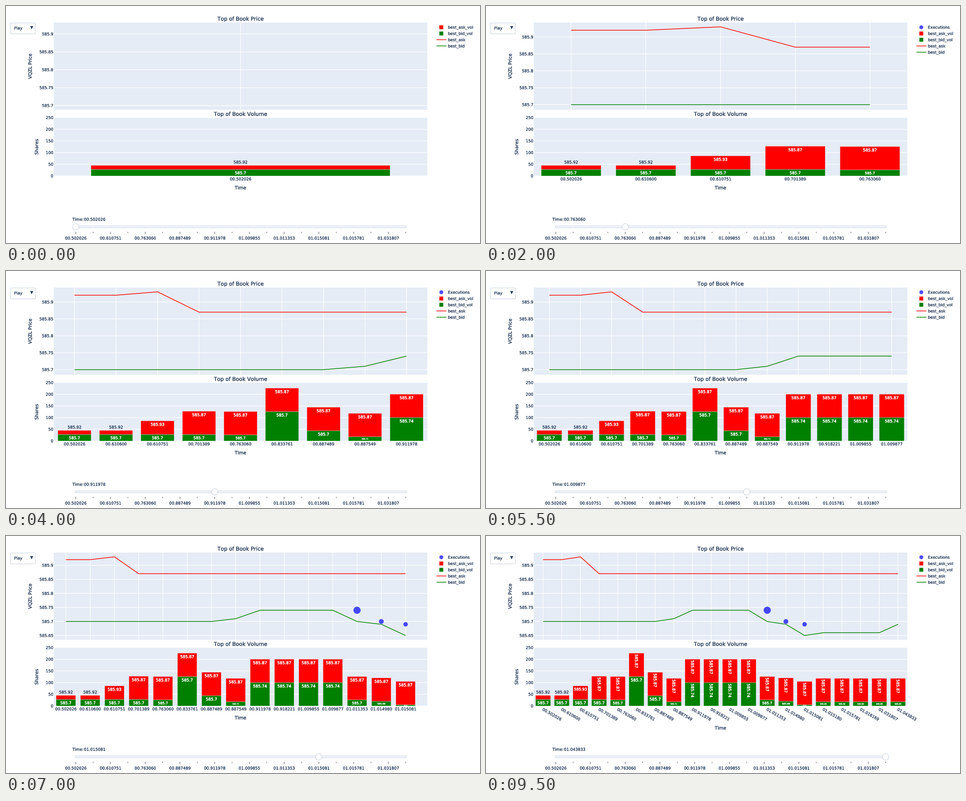
These frames come from a looping animation (1057 by 530 pixels, 10 s). A matplotlib script:

```python
import math

import matplotlib.pyplot as plt
from matplotlib.animation import FuncAnimation
from matplotlib.patches import Circle, FancyBboxPatch, Polygon, Rectangle
from matplotlib.patheffects import withStroke

W, H, DPI = 1057, 530, 100
INK, PANEL, BORDER = "#2a3f5f", "#E5ECF6", "#BEC8D9"
SMALL, MEDIUM, LARGE = 8.88, 10.36, 11.84   # font sizes in pixels
LEFT, RIGHT = 106.5, 939.5
P_TOP, P_BOTTOM = 37, 232                   # price panel
V_TOP, V_ZERO = 249.5, 380                  # volume panel
UNIT = (V_ZERO - V_TOP) / 250
PAD, LINE_H = 2.2, 10.4                     # bar label padding and height
STEPS = 20

TIMES = """00.502026 00.610600 00.610751 00.701389 00.763060
00.833761 00.887489 00.887549 00.911978 00.918221
01.009855 01.009877 01.011353 01.014980 01.015081
01.015180 01.015781 01.016169 01.031807 01.043833""".split()

# prices in cents above 585, volumes in shares
ASK = [92, 92, 93] + [87] * 17
BID = [70] * 7 + [71] + [74] * 4 + [70, 69, 65] + [66] * 4 + [69]
ASK_VOL = [17, 17, 58, 99] + [100] * 16
BID_VOL = [28, 28, 28, 28, 26, 126, 44, 18] + [100] * 4 + [26, 20, 5] + [18] * 5
EXECUTIONS = {12: (74, 8.3), 13: (70, 5.7), 14: (69, 5.3)}  # step: price, radius

plt.rcParams["text.kerning_factor"] = 6  # even letter spacing
plt.rcParams["font.family"] = "DejaVu Sans"
fig = plt.figure(figsize=(W / DPI, H / DPI), dpi=DPI, facecolor="white")
ax = fig.add_axes([0, 0, 1, 1])
ax.set_xlim(0, W)
ax.set_ylim(H, 0)
ax.axis("off")
moving = []


def pt(px):
    return px * 72 / DPI


def raw_text(x, y, s, size, color, ha, angle):
    # the thin stroke gives the letters weight and exact placement
    weight = 0.05 if color == "white" else 0.02
    return ax.text(x, y, s, fontsize=pt(size), color=color, ha=ha, va="baseline",
                   rotation=angle, rotation_mode="anchor", zorder=1,
                   path_effects=[withStroke(linewidth=pt(weight * size), foreground=color)])


def text(x, y, s, size=SMALL, color=INK, ha="center", angle=0):
    """Text whose capital height is centred on (x, y)."""
    a = math.radians(angle)
    shift = 0.365 * size
    return raw_text(x + shift * math.sin(a), y + shift * math.cos(a),
                    s, size, color, ha, angle)


def line(xs, ys, color="white", width=1.3):
    return ax.plot(xs, ys, color=color, lw=pt(width), zorder=1, snap=False,
                   solid_capstyle="butt", solid_joinstyle="round")[0]


def patch(p):
    p.set(zorder=1, snap=False)
    return ax.add_patch(p)


def rect(x, y, w, h, color, edge="none", width=0.0):
    return patch(Rectangle((x, y), w, h, fc=color, ec=edge, lw=pt(width)))


def rounded(x, y, w, h, r, color):
    return patch(FancyBboxPatch((x, y), w, h, fc=color, ec=BORDER, lw=pt(0.9),
                                boxstyle=f"round,pad=0,rounding_size={r}"))


def bubble(x, y, r):
    return patch(Circle((x, y), r, fc="blue", ec="white", lw=pt(0.74), alpha=0.7))


def slider_x(k):
    return 155.6 + k * 38.72


def draw_static():
    rect(LEFT, P_TOP, RIGHT - LEFT, P_BOTTOM - P_TOP, PANEL)
    rect(LEFT, V_TOP, RIGHT - LEFT, V_ZERO - V_TOP, PANEL)
    for v in range(0, 251, 50):
        y = V_ZERO - v * UNIT
        line([LEFT, RIGHT], [y, y])
        text(105.5, y, str(v), ha="right")

    text(523.5, 28.3, "Top of Book Price", LARGE)
    text(523.5, 241.3, "Top of Book Volume", LARGE)
    text(53.5, 134.5, "VQZL Price", MEDIUM, angle=90)
    text(68, 314.8, "Shares", MEDIUM, angle=90)

    rounded(10, 38, 55.7, 24.3, 1.6, "white")
    text(18, 49.3, "Play", ha="left")
    patch(Polygon([(53.7, 45), (60.7, 45), (57.2, 52)], fc=INK, ec="none"))

    rounded(154.3, 491.9, 738.4, 4, 1.8, "#F8FAFC")
    for k in range(STEPS):
        x = slider_x(k)
        major = k % 2 == 0
        line([x, x], [505, 510 if major else 507.8], "#333333", 0.9)
        if major:
            text(x, 519, TIMES[k])
    text(148, 477, "Time:", ha="left")


def draw_legend(n):
    y = 47.5
    if n >= 5:
        moving.append(bubble(970.7, y, 4.6))
        moving.append(text(985.5, y, "Executions", ha="left"))
        y += 14
    for i, (name, color) in enumerate([("best_ask_vol", "red"), ("best_bid_vol", "green"),
                                       ("best_ask", "red"), ("best_bid", "green")]):
        if i < 2:
            moving.append(rect(966.4, y - 4.3, 8.7, 8.7, color))
        else:
            moving.append(line([960, 982], [y, y], color, 1.5))
        moving.append(text(985.5, y, name, ha="left"))
        y += 13.95


def draw_prices(n, xs):
    lo, hi = min(BID[:n]), max(ASK[:n])
    top = P_TOP + 9.6
    bottom = P_BOTTOM - (11.4 if 5 <= n <= 13 else 9.4)

    def to_y(cents):
        return bottom - (cents - lo) / (hi - lo) * (bottom - top)

    for x in xs:
        moving.append(line([x, x], [P_TOP, P_BOTTOM]))
    for c in range(65, 95, 5):
        if c >= lo:
            y = to_y(c)
            moving.append(line([LEFT, RIGHT], [y, y]))
            moving.append(text(105.5, y, price_text(c), ha="right"))
    if n > 1:
        moving.append(line(xs, [to_y(c) for c in ASK[:n]], "red", 1.5))
        moving.append(line(xs, [to_y(c) for c in BID[:n]], "green", 1.5))
    for k, (cents, r) in EXECUTIONS.items():
        if k < n:
            moving.append(bubble(xs[k], to_y(cents), r))


def price_text(cents):
    return f"{585 + cents / 100:g}"


def bar_label(x, top, w, h, s, may_leave):
    """Label at the top of a bar: shrunk, turned or moved above to fit."""
    full = SMALL * (0.636 * (len(s) - 1) + 0.318)
    pad = PAD if h > 2 * PAD else 0
    iw, ih = w - 2 * pad, h - 2 * pad
    flat = min(1, iw / full, ih / LINE_H)
    turned = min(1, iw / LINE_H, ih / full)
    if may_leave and max(flat, turned) < 0.7:
        moving.append(text(x, top - PAD - LINE_H / 2, s))
    elif turned > flat:
        moving.append(text(x, top + pad + turned * full / 2, s,
                           SMALL * turned, "white", angle=-90))
    else:
        moving.append(text(x, top + pad + flat * LINE_H / 2 + 0.4 * flat, s,
                           SMALL * flat, "white"))


def draw_bars(n, xs, step):
    w = 0.8 * step
    for k, x in enumerate(xs):
        base = V_ZERO
        for vol, price, color in ((BID_VOL, BID, "green"), (ASK_VOL, ASK, "red")):
            h = vol[k] * UNIT
            base -= h
            moving.append(rect(x - w / 2, base, w, h, color, PANEL, 0.37))
            bar_label(x, base, w, h, price_text(price[k]), color == "red")

    slanted = n >= 17
    for x, s in zip(xs, TIMES):
        if slanted:
            moving.append(raw_text(x - 2.5, 389.5, s, SMALL, INK, "left", -30))
        else:
            moving.append(text(x, 386.8, s))
    moving.append(text(523, 429 if slanted else 406.3, "Time", MEDIUM))


def draw(k):
    while moving:
        moving.pop().remove()
    n = k + 1
    width = RIGHT - LEFT
    step = width / n
    if k in EXECUTIONS:  # room for a bubble at the right edge
        room = 0.05 * width + EXECUTIONS[k][1] + 1.5
        step = min(step, (width - room) / (n - 0.5))
    xs = [LEFT + (i + 0.5) * step for i in range(n)]

    draw_prices(n, xs)
    draw_bars(n, xs, step)
    draw_legend(n)
    moving.append(text(173.8, 477, TIMES[k], ha="left"))
    moving.append(patch(Circle((slider_x(k), 494), 7.2, fc="white",
                               ec=BORDER, lw=pt(0.9))))
    return moving


draw_static()
anim = FuncAnimation(fig, draw, frames=STEPS, init_func=lambda: draw(0),
                     interval=500, repeat=True, repeat_delay=0, blit=False)
plt.show()
```
